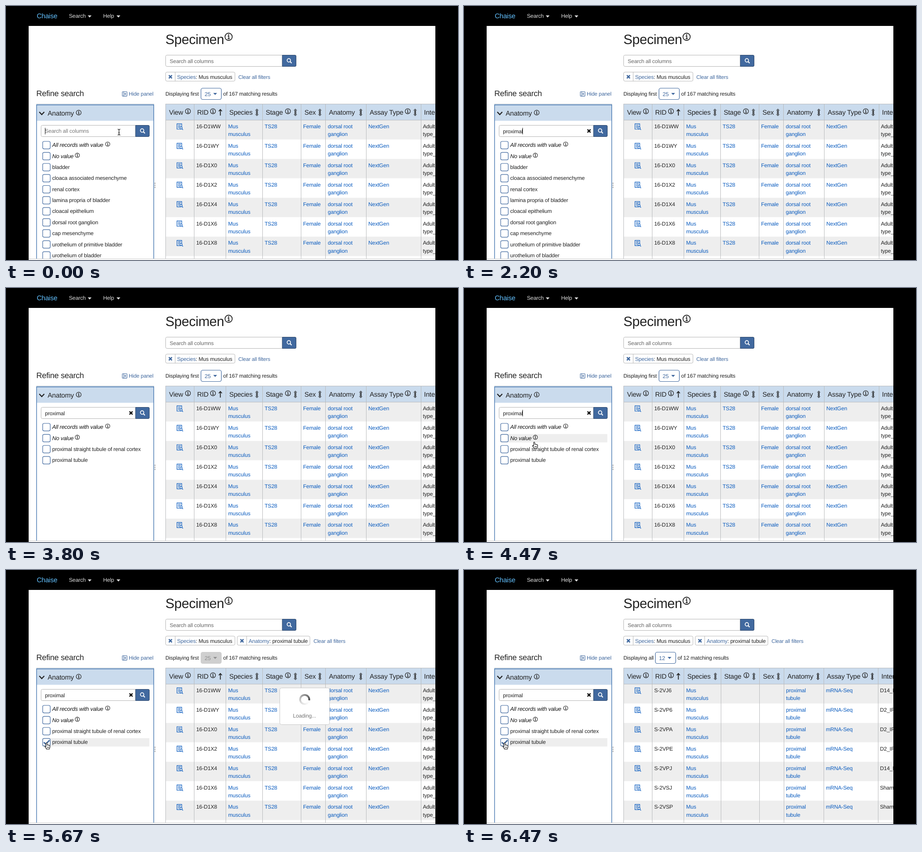
An HTML page for the animation above (8000 ms loop, 998 px wide and 561 px high).

```html
<!DOCTYPE html>
<html lang="en">
<head>
<meta charset="utf-8">
<title>Faceted search</title>
<style>
  html, body { margin: 0; width: 100%; height: 100%; overflow: hidden; background: #000; }
  svg { display: block; }
  text {
    font-family: "Liberation Sans", Arial, sans-serif;
    letter-spacing: -0.0125em;
    text-rendering: geometricPrecision;
  }
</style>
</head>
<body>
<svg id="stage" width="998" height="561" viewBox="0 0 998 561"></svg>
<script>
const LOOP = 8000;
const INK = '#222', BLUE = '#41699f', LINK = '#0b5cbf', HEAD = '#cadbed', LINE = '#b9bbbd';

// ---- drawing helpers ----
const text = (x, y, s, fill = INK, size = 11.9, extra = '') =>
  `<text x="${x}" y="${y}" fill="${fill}" font-size="${size}" ${extra}>${s}</text>`;
const rect = (x, y, w, h, fill, stroke = 'none', r = 0, sw = 1) =>
  `<rect x="${x}" y="${y}" width="${w}" height="${h}" rx="${r}" fill="${fill}" stroke="${stroke}" stroke-width="${sw}"/>`;
const path = (d, stroke, sw = 1, fill = 'none', extra = '') =>
  `<path d="${d}" stroke="${stroke}" stroke-width="${sw}" fill="${fill}" ${extra}/>`;
const group = (id, body, extra = '') => `<g id="${id}" ${extra}>${body}</g>`;
const at = (x, y, body, scale = 1) => `<g transform="translate(${x} ${y}) scale(${scale})">${body}</g>`;

const info = (x, y, r = 5.4) => at(x, y,
  `<circle r="5.4" fill="none" stroke="${INK}" stroke-width="1.2"/>` +
  path('M-1.4 -.9H.3V2.8M-1.6 2.9H1.8', INK, 1.2) +
  `<circle cx="0" cy="-2.8" r=".95" fill="${INK}"/>`, r / 5.4);
const sort = x => path(`M${x} 228V242M${x - 3.3} 230.8L${x} 227.3L${x + 3.3} 230.8M${x - 3.3} 239.2L${x} 242.7L${x + 3.3} 239.2M${x - 1.3} 230V240M${x + 1.3} 230V240`, INK, 1);
const triangle = (x, y, fill) => path(`M${x} ${y}h8.4l-4.2 4.6z`, 'none', 0, fill);
const cross = (x, y, color) => path(`M${x - 3.4} ${y - 3.4}l6.8 6.8m0 -6.8l-6.8 6.8`, color, 2.7);
const lens = (x, y) => `<circle cx="${x - 1}" cy="${y - 1}" r="3.8" fill="none" stroke="#fff" stroke-width="1.7"/>` +
  path(`M${x + 1.8} ${y + 1.8}L${x + 5.2} ${y + 5.2}`, '#fff', 2.1);
const searchBox = (x, y, w, split) =>
  rect(x + .5, y + .5, w - 1, 25, '#fff', '#b4b4b4', 3) +
  path(`M${split} ${y + .5}H${x + w - 3}q2.5 0 2.5 2.5v20q0 2.5 -2.5 2.5H${split}z`, '#2c4668', 1, BLUE) +
  lens((split + x + w) / 2, y + 13);

// ---- page furniture ----
function nav() {
  return rect(50, 44, 898, 517, '#fff') +
    text(68, 27, 'Chaise', '#63c1ff', 14.9) +
    text(139, 26, 'Search', '#dedede', 12) + triangle(180.5, 20.8, '#dedede') +
    text(214.5, 26, 'Help', '#dedede', 12) + triangle(244, 20.8, '#dedede') +
    text(352, 84, 'Specimen', INK, 29.8) + info(491.5, 68, 8) +
    searchBox(352, 108, 289, 610) + text(361.5, 125.7, 'Search all columns', '#666', 11.8) +
    text(67, 198.5, 'Refine search', INK, 17.5) +
    rect(256.8, 189.3, 10.4, 9.8, 'none', BLUE, 1, 1.1) +
    path('M260 189V199M265.5 194.2H262M264 192.2L262 194.2L264 196.2', BLUE, 1.1) +
    text(271, 198, 'Hide panel', BLUE, 11.7) +
    [391.5, 396, 400.5].map(y => `<circle cx="329" cy="${y}" r="1.5" fill="#b8b8b8"/>`).join('');
}

function chip(x, w, name, value) {
  return rect(x + .5, 146, w, 20, '#fff', '#b8b8b8', 3) + path(`M${x + 21.5} 146V166`, '#b8b8b8') +
    cross(x + 11, 156.3, BLUE) +
    text(x + 25.7, 160.7, `<tspan fill="${BLUE}">${name}</tspan>: ${value}`);
}

const pager = (label, x, count, rest, color, fill) =>
  text(352, 197.5, label, INK, 11.7) +
  rect(x + .5, 181.5, 45, 25, fill, color === BLUE ? BLUE : fill, 4, 1.2) +
  text(x + 8.5, 199, count, color, 12.4) + triangle(x + 27.6, 192, color) +
  text(x + 49.5, 197.5, rest);

// ---- results table ----
const rowIcon = y => at(383.5, y,
  path('M3 5.5H-6V-6.3H4.5V.5M-3.8 -3.5H2.5M-3.8 -.7H1.3M-3.8 2H-.8', LINK, 1.2) +
  `<circle cx="3" cy="2.7" r="2.5" fill="none" stroke="${LINK}" stroke-width="1.2"/>` +
  path('M4.8 4.6L7.3 7', LINK, 1.4));

function table(cols, titles, infos, sorts, rows) {
  let s = rect(352, 216, 600, 36, HEAD);
  rows.forEach((cells, i) => {
    const y = 252 + 42.9 * i;
    s += rect(352, y, 600, 42.9, i % 2 ? '#fff' : '#eee') + rowIcon(y + 14.5);
    cells.forEach(([x, words, color]) => words.split('|').forEach((w, j) => {
      s += text(x, y + 18 + 17.1 * j, w, color);
    }));
  });
  s += path(`M352 216.5H950M352 252H950`, LINE);
  s += path([352, ...cols].map(x => `M${x + .5} 216V558`).join(''), LINE);
  titles.forEach(([x, w]) => s += text(x, 240, w, INK, 14.8));
  infos.forEach(x => s += info(x, 232.5, 5.6));
  sorts.forEach(x => s += sort(x));
  return s + path('M473.3 242V229M469.8 232.5L473.3 228.5L476.8 232.5', INK, 1.8);
}

const titlesAt = (stage, sex, anatomy, assay, last) => [[360, 'View'], [422, 'RID'], [493, 'Species'],
  [stage, 'Stage'], [sex, 'Sex'], [anatomy, 'Anatomy'], [assay, 'Assay Type'], [last, 'Internal']];

const firstTable = table([415, 485, 566, 651, 705, 795, 916], titlesAt(573.5, 659, 713, 803, 923),
  [401.7, 457, 622.5, 887], [554, 639, 693, 783.3, 903.3],
  ['WW', 'WY', 'X0', 'X2', 'X4', 'X6', 'X8'].map(id => [
    [420, '16-D1' + id, INK], [490.5, 'Mus|musculus', LINK], [571, 'TS28', LINK], [656, 'Female', LINK],
    [710.5, 'dorsal root|ganglion', LINK], [800, 'NextGen', LINK], [920.5, 'Adult|type_', INK]]));

const secondTable = table([415, 485, 567, 652, 706, 794, 914], titlesAt(574.5, 660, 714, 801, 921.5),
  [401.7, 457, 623.5, 885.3], [555, 640, 694, 781.5, 901.5],
  [['J6', 'D14_I'], ['P6', 'D2_IR'], ['PA', 'D2_IR'], ['PE', 'D2_IR'], ['PJ', 'D14_I'], ['SJ', 'Sham'], ['SP', 'Sham']]
    .map(([id, tag]) => [[420, 'S-2V' + id, INK], [490.5, 'Mus|musculus', LINK],
      [711, 'proximal|tubule', LINK], [799, 'mRNA-Seq', LINK], [918.5, tag, INK]]));

// ---- facet panel ----
const rowY = i => 307.2 + 24.37 * i;
const option = (name, i, extra = '') => rect(81, rowY(i) - 8.2, 16.6, 16.6, '#fff', BLUE, 3, 1.2) +
  text(102, rowY(i) + 4, name, extra ? '#111' : INK, extra ? 12.3 : 11.9, extra);
const options = names => names.map((n, i) => option(n, i + 2)).join('');
const italic = 'font-style="italic"';

const panel =
  rect(67.5, 216.5, 259, 360, '#fff', '#b6c0ca') + rect(68, 217, 258, 36.5, HEAD) +
  group('focus', rect(67.5, 218.5, 258.8, 360, 'none', '#4677b0', 0, 1.4)) +
  path('M73.5 234L79 239.8L84.5 234', INK, 2.3) + text(92, 242, 'Anatomy', INK, 15) + info(160.5, 235.5) +
  searchBox(77, 263, 240, 286) +
  group('hint', text(86, 280, 'Search all columns', '#777', 11.8)) +
  `<text id="typed" x="86" y="281" fill="${INK}" font-size="11.9"></text>` +
  group('clear', cross(276, 276, '#111')) +
  group('caret', path('M0 269V283.5', '#111', 1)) +
  group('hover', rect(80, -9, 236.5, 18.5, '#eee')) +
  option('All records with value', 0, italic) + info(224.5, 305, 4.8) +
  option('No value', 1, italic) + info(157.5, 329.7, 4.8) +
  group('allOptions', options(['bladder', 'cloaca associated mesenchyme', 'renal cortex', 'lamina propria of bladder',
    'cloacal epithelium', 'dorsal root ganglion', 'cap mesenchyme', 'urothelium of primitive bladder', 'urothelium of bladder'])) +
  group('matches', options(['proximal straight tubule of renal cortex', 'proximal tubule'])) +
  group('check', path('M83.5 380.5L87.7 384.8L96 376', BLUE, 2.8)) +
  group('sync', path('M-7 -1.2A7 7 0 0 1 5.2 -4.8M7 1.2A7 7 0 0 1 -5.2 4.8', '#777', 1.9) +
    path('M8 -7V-1.6H2.6zM-8 7V1.6H-2.6z', 'none', 0, '#777'));

// ---- loading box: ring fades along its tail ----
function ring() {
  const n = 36, step = 2 * Math.PI / n;
  let s = '';
  for (let i = 0; i < n; i++) {
    const a = -i * step, b = a - step * 1.1;
    s += path(`M${10 * Math.cos(a)} ${10 * Math.sin(a)}A10 10 0 0 0 ${10 * Math.cos(b)} ${10 * Math.sin(b)}`,
      '#444', 4, 'none', `opacity="${(1 - i / n) ** 1.7}"`);
  }
  return s;
}
const loading = rect(604.5, 260.5, 110, 81, '#fff', '#c8c8c8', 4) + group('spin', ring()) +
  text(659, 325.5, 'Loading...', '#777', 12, 'text-anchor="middle"');

// ---- pointers ----
const pointers =
  group('beam', path('M-3 -6.5Q0 -6.5 0 -4.5Q0 -6.5 3 -6.5M0 -4.5V4.5M-3 6.5Q0 6.5 0 4.5Q0 6.5 3 6.5M-1.5 1.5H1.5', '#111', 1.2)) +
  group('arrow', path('M0 0V11.5L2.6 9.2L4.4 13.2L6.4 12.3L4.7 8.4H8.2Z', '#fff', .9, '#111')) +
  group('hand', path('M-1.3 8.5V1.2Q0 -.8 1.3 1.2V5.2Q2.6 4.2 3.7 5.6Q5 4.8 6 6.2Q7.4 5.8 7.6 7.4V10.2Q7.4 12 6.3 13V14.5H-.2V13.2Q-2.4 11 -3.8 8.6Q-3.4 6.8 -1.3 8.5Z', '#111', 1.1, '#fff') +
    path('M1.6 9V12M3.4 9V12M5.2 9V12', '#111', .8));

document.getElementById('stage').innerHTML =
  '<clipPath id="page"><rect x="50" y="0" width="898" height="558"/></clipPath>' + nav() +
  chip(352, 153, 'Species', 'Mus musculus') +
  group('oneFilter', text(513, 160.7, 'Clear all filters', BLUE, 11.5)) +
  group('twoFilters', chip(510, 160.5, 'Anatomy', 'proximal tubule') + text(679, 160.7, 'Clear all filters', BLUE, 11.5)) +
  group('pageOpen', pager('Displaying first', 430, '25', 'of 167 matching results', BLUE, '#fff')) +
  group('pageBusy', pager('Displaying first', 430, '25', 'of 167 matching results', '#8e8e8e', '#cfcfcf')) +
  group('pageDone', pager('Displaying all', 422, '12', 'of 12 matching results', BLUE, '#fff')) +
  '<g clip-path="url(#page)">' + group('before', firstTable) + group('after', secondTable) + panel + '</g>' +
  path('M50 558.5H948', '#ccc') + group('loading', loading) + pointers;

// ---- timeline ----
const el = {};
document.querySelectorAll('[id]').forEach(e => el[e.id] = e);
const show = (id, on) => el[id].style.display = on ? '' : 'none';
const move = (id, x, y, turn = 0) => el[id].setAttribute('transform', `translate(${x} ${y}) rotate(${turn})`);

const keys = [200, 330, 470, 600, 800, 930, 1070, 1200];
const blinks = [1730, 2200, 2730, 3270, 3800, 4270, 4800, 5270];
const LISTED = 3800, CHECKED = 5470, BUSY = 5530, DONE = 6400;
const route = [[4200, 247, 280], [4330, 215, 300], [4470, 155, 340], [4600, 92, 370], [4730, 56, 381],
  [4800, 58, 381], [4870, 69, 380], [4930, 79, 380.5], [5000, 88, 381], [5130, 89.5, 381.3]];

function pointerAt(t) {
  if (t < 200) return [249.5, 278.5];
  if (t < route[0][0]) return null;
  const i = route.findIndex(p => p[0] > t);
  if (i < 0) return route[route.length - 1].slice(1);
  const [a, b] = [route[i - 1], route[i]], k = (t - a[0]) / (b[0] - a[0]);
  return [a[1] + (b[1] - a[1]) * k, a[2] + (b[2] - a[2]) * k];
}

function draw(t) {
  const typed = 'proximal'.slice(0, keys.filter(k => t >= k).length);
  el.typed.textContent = typed;
  show('hint', !typed);
  show('clear', typed);
  const caretX = typed ? 86 + el.typed.getComputedTextLength() : 86;
  move('caret', Math.floor(caretX) + .5, 0);
  show('caret', t < CHECKED && blinks.filter(b => t >= b).length % 2 === 0);

  show('sync', t >= 3270 && t < LISTED);
  move('sync', 314, 236, (t - 3270) * .18);
  show('allOptions', t < LISTED);
  show('matches', t >= LISTED);

  const p = pointerAt(t);
  const inInput = p && p[0] > 77 && p[0] < 286 && p[1] > 263 && p[1] < 289;
  const row = p && p[0] >= 80 && p[0] < 317 ? Math.round((p[1] - rowY(0)) / 24.37) : -1;
  const onRow = row >= 0 && row < 4 && !inInput;
  show('beam', inInput);
  show('hand', onRow);
  show('arrow', p && !inInput && !onRow);
  if (p) ['beam', 'hand', 'arrow'].forEach(id => move(id, ...p));
  show('hover', onRow);
  move('hover', 0, rowY(row));
  show('focus', !p || p[0] >= 72);

  const busy = t >= BUSY && t < DONE;
  show('check', t >= CHECKED);
  show('oneFilter', t < BUSY);
  show('twoFilters', t >= BUSY);
  show('pageOpen', t < BUSY);
  show('pageBusy', busy);
  show('pageDone', t >= DONE);
  show('before', t < DONE);
  show('after', t >= DONE);
  show('loading', busy);
  move('spin', 659.5, 286, (t - 5670) * .36 + 10);
}

// The picture advances fifteen times a second.
function tick() {
  const n = Math.floor((performance.now() % LOOP + 3.5) * 15 / 1000) % 120;
  draw(Math.round(n * 20 / 3) * 10);
  requestAnimationFrame(tick);
}
tick();
</script>
</body>
</html>
```
